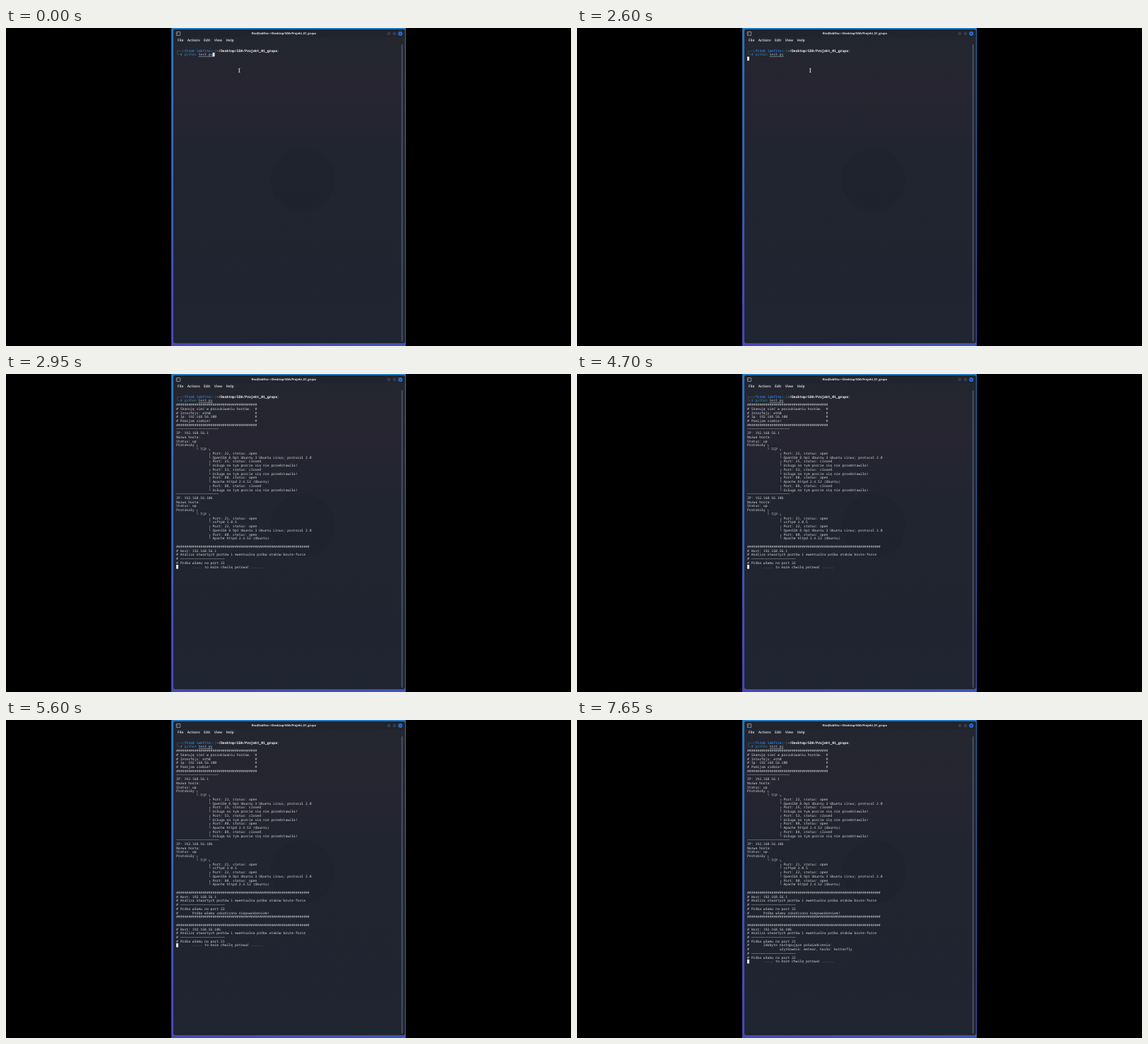
An HTML page that plays this animation: 800 px wide and 450 px high, repeating every 8 s.

```html
<!DOCTYPE html>
<html lang="pl">
<meta charset="utf-8">
<title>Terminal</title>
<style>
  html, body { margin: 0; height: 100%; overflow: hidden; background: #000; }
  svg { display: block; width: 100vw; height: 100vh; }
  text { font: 600 5px "Open Sans", "Noto Sans", sans-serif; fill: #e4e6ec; text-rendering: geometricPrecision; white-space: pre; }
  #term text { font: 400 4.772px "Noto Sans Mono", "DejaVu Sans Mono", monospace; fill: #d2d4da; }
  #term .box { fill: #3183a0; }
  #term .user { fill: #2878d8; font-weight: 700; }
  #term .path { fill: #f4f5f8; font-weight: 700; }
  #term .cmd { fill: #3a8c98; }
  #term .arg { fill: #b4c4cc; text-decoration: underline; }
</style>
<svg viewBox="0 0 800 450">
  <defs>
    <linearGradient id="desk" gradientUnits="userSpaceOnUse" x1="234" y1="450" x2="400" y2="60">
      <stop stop-color="#4a45b8"/><stop offset="1" stop-color="#2675b8"/>
    </linearGradient>
    <linearGradient id="glass" x2="0" y2="1">
      <stop stop-color="#23262f"/><stop offset=".2" stop-color="#262531"/>
      <stop offset=".45" stop-color="#20252f"/><stop offset="1" stop-color="#1f2531"/>
    </linearGradient>
  </defs>
  <rect width="800" height="450"/>
  <rect x="234" width="332" height="450" fill="url(#desk)"/>
  <rect x="237" y="2" width="328" height="444" rx="3" fill="url(#glass)"/>
  <circle cx="420" cy="215" r="45" fill="#1d222c" opacity=".5"/>
  <path d="M237 13V5a3 3 0 0 1 3-3h322a3 3 0 0 1 3 3v8z" fill="#20242e"/>
  <rect x="559.8" y="23" width="2" height="421" rx="1" fill="#4b4e58"/>
  <g fill="none" stroke="#d0d3da" stroke-width=".6">
    <rect x="241.3" y="5.4" width="5.4" height="5.2" rx=".5"/>
    <path d="M242.4 6.8l1 .9-1 .9"/>
  </g>
  <g fill="#383b47">
    <circle cx="542" cy="8" r="2.4"/><circle cx="550" cy="8" r="2.4"/>
    <circle cx="558.3" cy="8" r="3" fill="#2b70da"/>
  </g>
  <path d="M557.2 6.9l2.2 2.2m0-2.2l-2.2 2.2" stroke="#15264a" stroke-width=".7"/>
  <text x="393.2" y="9.4" text-anchor="middle" style="font-size:4.05px;font-weight:700">fito@labfito:~/Desktop/SDA/Projekt_01_grupa</text>
  <text x="243" y="19">File</text>
  <text x="256.8" y="19">Actions</text>
  <text x="280" y="19">Edit</text>
  <text x="294.8" y="19">View</text>
  <text x="311.6" y="19">Help</text>
  <g id="term"></g>
  <path id="mouse" d="M329 57.2q1.3 0 1.3.8v4q0 .8-1.3.8m2.6-5.6q-1.3 0-1.3.8v4q0 .8 1.3.8" fill="none" stroke="#d8dae0" stroke-width=".7"/>
  <rect id="cursor" width="2.9" height="5.6" fill="#f2f3f6"/>
</svg>
<script>
const LOOP = 8000, CW = 2.863, LH = 5.737, LEFT = 241;
const $ = id => document.getElementById(id);
const term = $('term'), cursor = $('cursor'), mouse = $('mouse');
const items = [];

function put(row, col, str, from = 0, to = LOOP, cls = '') {
  const el = document.createElementNS('http://www.w3.org/2000/svg', 'text');
  el.setAttribute('x', LEFT + col * CW);
  el.setAttribute('y', 33.6 + row * LH);
  el.setAttribute('class', cls);
  el.textContent = str;
  term.append(el);
  items.push({ el, from, to });
}
const block = (from, row, lines) =>
  lines.forEach((s, i) => s && put(row + i, 0, s, from));

const hash = n => '#'.repeat(n), rule = n => '─'.repeat(n);
const boxed = s => ('# ' + s).padEnd(39) + '#';
const pad = ' '.repeat(16);
const port = (n, state, info) =>
  [`${pad}┌ Port: ${n}, status: ${state}`, `${pad}└ ${info}`];
const host = (ip, ports) => [rule(21), 'IP: 192.168.56.' + ip, 'Nazwa hosta:', 'Status: up',
  'Protokoły ┐', '          └ TCP ┐', ...ports.flatMap(p => port(...p))];
const attack = (ip, n) => [hash(66), '# Host: 192.168.56.' + ip,
  '# Analiza otwartych portów i ewentualna próba ataków brute-force',
  '# ' + rule(22), '# Próba włamu na port ' + n];
const note = s => '#       ' + s;
const wait = note('..... to może chwilę potrwać ......');
const ssh = [22, 'open', 'OpenSSH 8.9p1 Ubuntu 3 Ubuntu Linux; protocol 2.0'];
const web = [80, 'open', 'Apache httpd 2.4.52 (Ubuntu)'];
const silent = n => [n, 'closed', 'Usługa na tym porcie się nie przedstawiła!'];

// prompt
[[0, 0, '┌──(', 'box'], [0, 4, 'fito@', 'user'], [0, 10, 'labfito', 'user'], [0, 17, ')-[', 'box'],
 [0, 20, '~/Desktop/SDA/Projekt_01_grupa', 'path'], [0, 50, ']', 'box'],
 [1, 0, '└─', 'box'], [1, 2, '$', 'user'], [1, 4, 'python', 'cmd'], [1, 11, 'test.py', 'arg']
].forEach(([r, c, s, cls]) => put(r, c, s, 0, LOOP, cls));

// program output
block(2850, 2, [hash(40), boxed('Skanuję sieć w poszukiwaniu hostów.'), boxed('Interfejs: eth0'),
  boxed('Ip: 192.168.56.100'), boxed('Pomijam siebie!'), hash(40)]);
block(2950, 8, [
  ...host(1, [ssh, silent(25), silent(53), web, silent(88)]),
  ...host(106, [[21, 'open', 'vsftpd 3.0.5'], ssh, web]),
  '', ...attack(1, 22)]);
put(42, 0, wait, 2950, 5600);
block(5600, 42, [note('Próba włamu zakończona niepowodzeniem!'), hash(66), '', ...attack(106, 21)]);
put(50, 0, wait, 5600, 7650);
block(7650, 50, [note('Zdobyto następujące poświadczenia:.'),
  note('        użytkownik: meteor, hasło: butterfly'),
  '# ' + rule(22), '# Próba włamu na port 22', wait]);

// time, row, column
const stops = [[0, 1, 18], [2600, 2, 0], [2850, 8, 0], [2950, 42, 0], [5600, 50, 0], [7650, 54, 0]];
const show = (el, on) => { el.style.display = on ? '' : 'none'; };

function draw(t) {
  for (const { el, from, to } of items) show(el, t >= from && t < to);
  show(mouse, t < 2850);
  const [, row, col] = stops.findLast(s => s[0] <= t);
  cursor.setAttribute('x', LEFT + col * CW);
  cursor.setAttribute('y', 29.1 + row * LH);
}
const start = performance.now();
function frame() {
  draw((performance.now() - start) % LOOP);
  requestAnimationFrame(frame);
}
frame();
</script>
</html>
```
